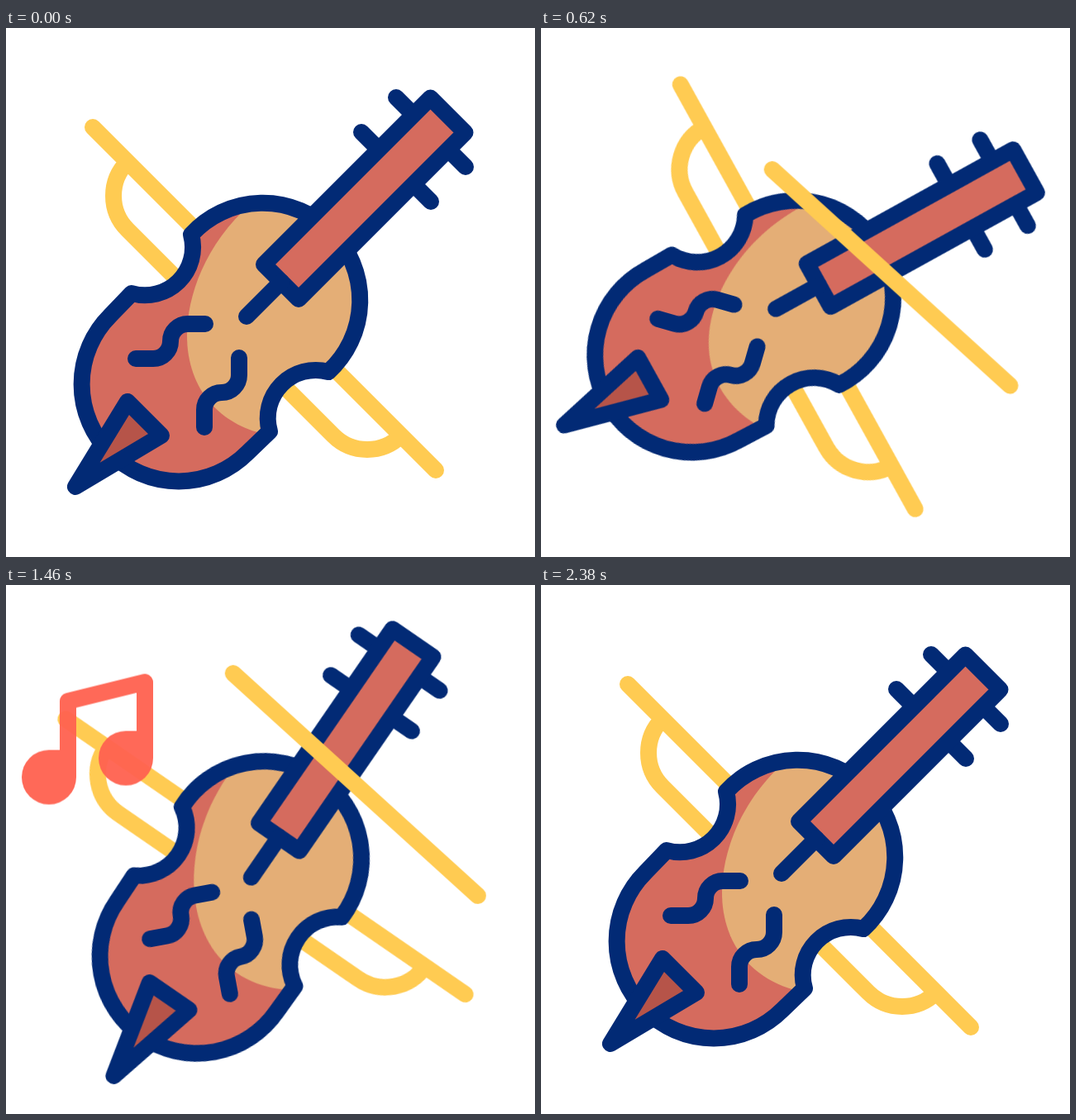
Animation, 640 px wide and 640 px high, one loop 2.4 s. Source, as an HTML page:

```html
<!DOCTYPE html>
<html lang="en">
<head>
<meta charset="utf-8">
<title>Violin</title>
<style>
  html, body { margin: 0; width: 100%; height: 100%; overflow: hidden; background: #fff; }
  svg { display: block; width: 100%; height: 100%; }
  svg, .navy, .yellow { stroke-width: 20; stroke-linecap: round; stroke-linejoin: round; }
  .navy { stroke: #022a75; }
  .yellow { stroke: #ffcb52; }

  .swing, .stroke, .trim, .note {
    animation: 2400ms cubic-bezier(.333, 0, .667, 1) infinite;
  }
  .swing { transform-origin: 320px 320px; animation-name: swing; }
  .stroke { animation-name: stroke; }
  .trim { stroke-dasharray: 1 2; animation-name: trim; }
  .note { animation-name: rise, fade; }
  .show { animation: show 2400ms step-end infinite; }

  @keyframes swing {
    0%, 99.17%, 100% { transform: rotate(0deg); }
    32.5% { transform: rotate(18deg); }
    65.42% { transform: rotate(-12deg); }
  }
  @keyframes stroke {
    0% { transform: translate(165px, 107px); }
    28.75% { transform: translate(283px, 173px); }
    45.42% { transform: translate(230px, 82px); }
    72.5%, 100% { transform: translate(304px, 123px); }
  }
  @keyframes trim {
    0% { stroke-dashoffset: 1; }
    28.75%, 71.67% { stroke-dashoffset: 0; }
    92%, 100% { stroke-dashoffset: -1; }
  }
  @keyframes show {
    0% { opacity: 0; }
    .5% { opacity: 1; }
    92%, 100% { opacity: 0; }
  }
  @keyframes rise {
    0%, 38.75% { transform: translateY(68px); }
    71.67%, 100% { transform: translateY(-184px); }
  }
  @keyframes fade {
    0%, 38.75% { opacity: 0; }
    46.25%, 59.17% { opacity: 1; }
    72.5%, 100% { opacity: 0; }
  }
</style>
</head>
<body>
<svg viewBox="0 0 640 640" fill="none">
  <defs>
    <path id="body" d="M224 250A117.5 117.5 0 1 1 390 416A58 58 0 0 0 319 488L292 514A117 117 0 1 1 126 348L152 321A58 58 0 0 0 224 250Z"/>
    <clipPath id="inside"><use href="#body"/></clipPath>
    <!-- one side of the violin, mirrored over its long axis -->
    <path id="side" d="M472 84L493 105M430 126L451 147M157 400H178A21 21 0 0 0 199 379A21 21 0 0 1 220 358H241"/>
    <path id="head" d="M33 -33H0A33 33 0 1 0 33 0Z"/>
  </defs>

  <g class="swing">
    <path class="yellow" d="M105 120L520 535M147 162A58 58 0 0 0 147 244L396 493A58 58 0 0 0 478 493"/>
    <use href="#body" fill="#d56b5e"/>
    <path clip-path="url(#inside)" fill="#e4ae76" d="M297 212C240 262 219 325 219 372C219 440 262 480 312 491L460 460V200Z"/>
    <g class="navy">
      <use href="#body"/>
      <path fill="#b65449" d="M84 555L147 452L188 493Z"/>
      <use href="#side"/>
      <use href="#side" transform="matrix(0 -1 -1 0 640 640)"/>
      <path fill="#d56b5e" d="M513.500 84.500L555.500 126.500L354 328L312 286Z"/>
      <path d="M333 307L291 349"/>
    </g>
  </g>

  <g class="show">
    <g class="stroke">
      <path class="trim yellow" pathLength="1" d="M0 0L296 269"/>
    </g>
  </g>

  <g class="note">
    <path stroke="#ff6250" d="M75 345V261L168 238V322"/>
    <g fill="#ff6250">
      <use href="#head" x="52" y="353"/>
      <use href="#head" x="145" y="330"/>
    </g>
  </g>
</svg>
</body>
</html>
```
